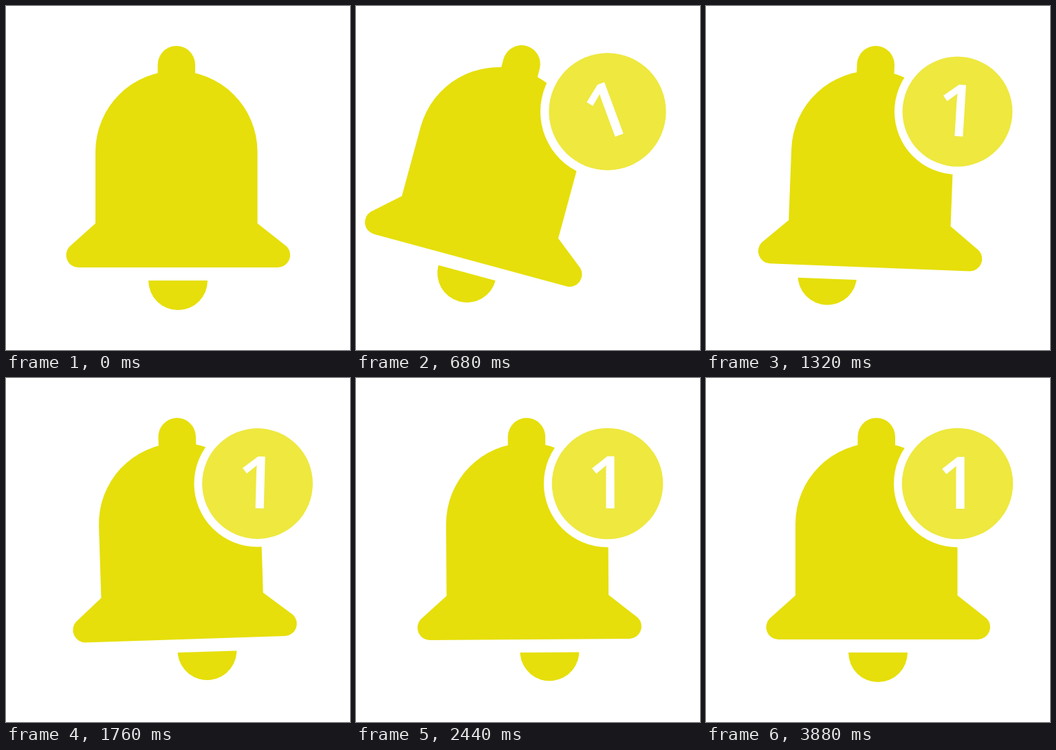
An HTML page for the animation above (4.04 s loop, 500 by 500 pixels).

```html
<!DOCTYPE html>
<html lang="en">
<head>
<meta charset="utf-8">
<title>Notification bell</title>
<style>
  html, body { margin: 0; width: 100%; height: 100%; overflow: hidden; background: #fff; }
  svg { display: block; width: 100vw; height: 100vh; }
  text { font: 600 106px "Open Sans", sans-serif; text-anchor: middle; }
</style>
</head>
<body>
<svg viewBox="0 0 500 500">
  <g fill="#e6df0b">
    <circle id="clapper" cx="250" cy="399" r="43"/>
    <g id="bell">
      <path fill="#fff" d="M60 330H440V399H60Z"/>
      <path d="M220.5 110V85.5a27.25 27.5 0 0 1 54.5 0V110Z"/>
      <path d="M130 212a117.75 117.75 0 0 1 235.5 0V316L408 349.5A18 18 0 0 1 395.5 380H105A18 18 0 0 1 92 350L130 316Z"/>
    </g>
  </g>
  <g id="badge" fill="#fff">
    <circle r="92.5"/>
    <circle r="80.75" fill="#eee83f"/>
    <text id="count" y="36">1</text>
  </g>
</svg>
<script>
  const LOOP = 4040, STEP = 40, REST = 3.88;
  const SWING = 8.6;      // rad/s
  const BELL_END = 0.533; // first swing is over
  const POP_END = 0.625;  // badge has popped in
  const [clapper, bell, badge, count] =
    ['clapper', 'bell', 'badge', 'count'].map(id => document.getElementById(id));

  const clamp = x => Math.min(1, Math.max(0, x));
  const ring = (t, amp, decay) => amp * Math.exp(-decay * t) * Math.sin(SWING * t);

  // Smooth interpolation through [time, value] keys.
  function keyed(t, keys) {
    let [t0, v0] = keys[0];
    for (const [t1, v1] of keys) {
      if (t < t1) {
        const p = clamp((t - t0) / (t1 - t0));
        return v0 + (v1 - v0) * p * p * (3 - 2 * p);
      }
      [t0, v0] = [t1, v1];
    }
    return v0;
  }

  function bellAngle(t) {
    return t < BELL_END
      ? -28 * Math.sin(Math.PI * t / BELL_END)
      : ring(t - BELL_END, 21, 1.9);
  }

  function clapperLag(t) {
    const fade = clamp((t - 0.25) / 0.38) * clamp((REST - t) / 0.6);
    return -15 * fade * Math.exp(-0.75 * (t - 0.96)) * Math.cos(2 * Math.PI * (t - 2.43) / 0.778);
  }

  function badgeScale(t) {
    return t < POP_END
      ? keyed(t, [[0.08, 0], [0.44, 0.953], [POP_END, 1]])
      : 1 + ring(t - POP_END, 0.133, 2);
  }

  function countAngle(t) {
    return t < POP_END
      ? keyed(t, [[0.08, 0], [0.34, -20], [0.58, 6], [POP_END, 0]])
      : ring(t - POP_END, -50, 2.1);
  }

  const swing = (el, angle) => el.setAttribute('transform', `rotate(${angle} 247.5 58)`);

  function draw(t) {
    const settled = t >= REST;
    const angle = settled ? 0 : bellAngle(t);
    swing(bell, angle);
    swing(clapper, angle + clapperLag(t));
    badge.setAttribute('transform', `translate(365.5 153.5) scale(${settled ? 1 : badgeScale(t)})`);
    count.setAttribute('transform', `rotate(${settled ? 0 : countAngle(t)})`);
  }

  const start = performance.now();
  function tick() {
    const ms = (performance.now() - start) % LOOP;
    draw(Math.min(REST, Math.floor(ms / STEP) * STEP / 1000));
    requestAnimationFrame(tick);
  }
  tick();
</script>
</body>
</html>
```
